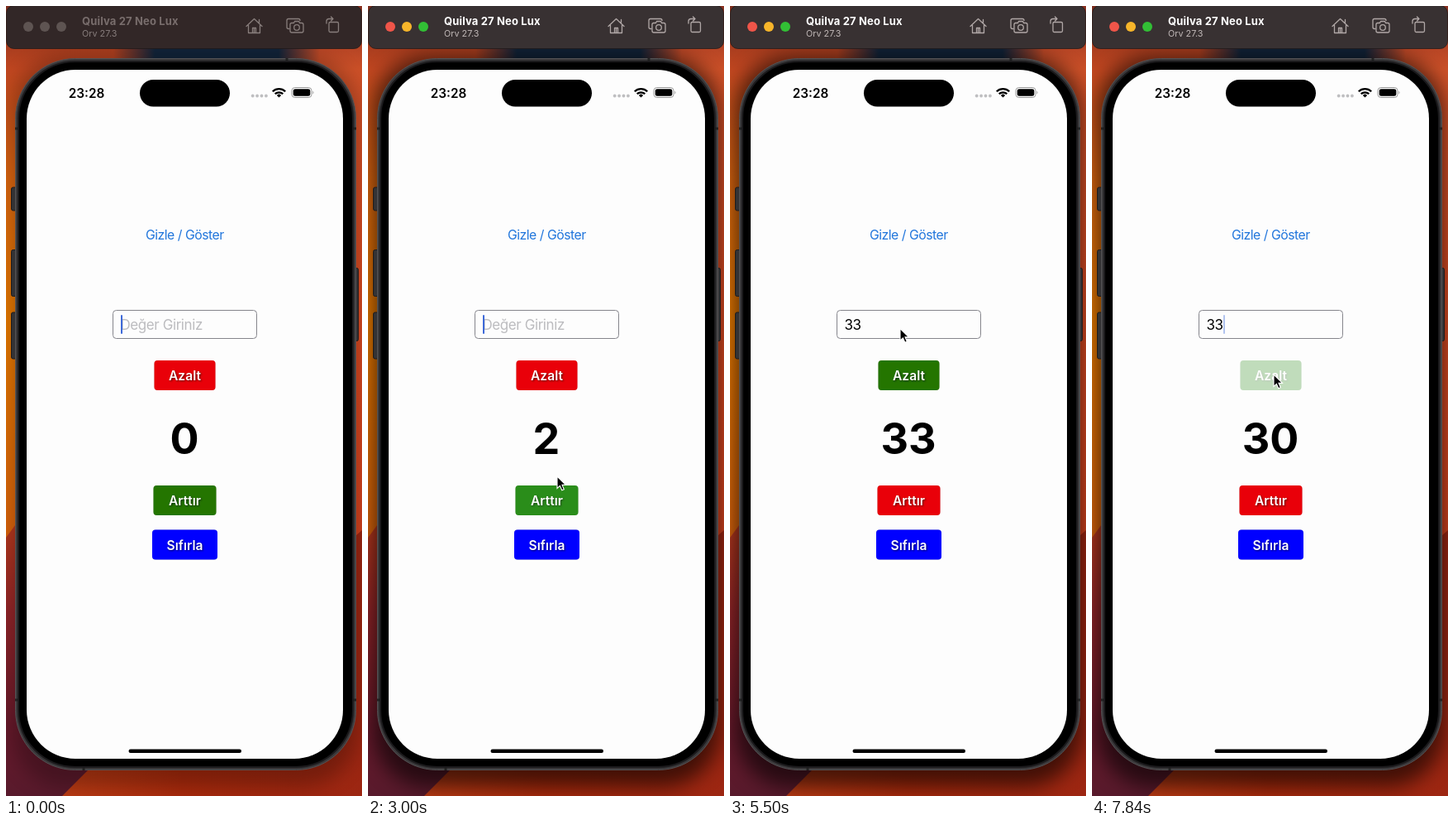
These frames come from a looping animation (431x954 px, 8 s). An HTML page:

```html
<!DOCTYPE html>
<html lang="tr">
<head>
<meta charset="utf-8">
<title>Sayaç</title>
<style>
html, body { margin: 0; width: 100%; height: 100%; overflow: hidden; background: #222; }
svg { display: block; width: 100%; height: 100%; }
text { font-family: Inter, "Open Sans", sans-serif; white-space: pre; }
.mid { text-anchor: middle; }
.btn text { font-size: 15.6px; font-weight: 600; fill: #fff; filter: drop-shadow(1px 1px 1px rgba(0,0,0,.6)); }
.btn rect { filter: drop-shadow(0 .5px .5px rgba(0,0,0,.25)); }
.field { font-size: 17px; letter-spacing: -.4px; }
.icon { fill: none; stroke-width: 1.3; stroke-linejoin: round; stroke-linecap: round; }
</style>
</head>
<body>
<svg viewBox="0 0 431 954" preserveAspectRatio="none">
  <defs>
    <linearGradient id="wallL" x2="0" y2="1">
      <stop offset="0" stop-color="#7c2c1c"/><stop offset=".08" stop-color="#c04620"/>
      <stop offset=".22" stop-color="#e06810"/><stop offset=".4" stop-color="#ec7c00"/>
      <stop offset=".67" stop-color="#e0660c"/>
    </linearGradient>
    <linearGradient id="wallR" x2="0" y2="1">
      <stop offset="0" stop-color="#8a3020"/><stop offset=".08" stop-color="#cc5028"/>
      <stop offset=".35" stop-color="#d64a22"/><stop offset=".67" stop-color="#d2421e"/>
    </linearGradient>
    <linearGradient id="maroon" x2="0" y2="1">
      <stop offset="0" stop-color="#c23e1c"/><stop offset=".35" stop-color="#96262a"/>
      <stop offset=".75" stop-color="#6a1a2c"/><stop offset="1" stop-color="#581a2c"/>
    </linearGradient>
    <linearGradient id="ember">
      <stop offset="0" stop-color="#bc3c14"/><stop offset=".4" stop-color="#aa2a0c"/>
      <stop offset="1" stop-color="#9c2612"/>
    </linearGradient>
    <linearGradient id="navy">
      <stop offset="0" stop-color="#12243a" stop-opacity="0"/><stop offset=".2" stop-color="#12243a"/>
      <stop offset=".8" stop-color="#12243a"/><stop offset="1" stop-color="#12243a" stop-opacity="0"/>
    </linearGradient>
    <filter id="blur" x="-20%" y="-20%" width="140%" height="140%"><feGaussianBlur stdDeviation="12"/></filter>
  </defs>

  <!-- wallpaper -->
  <rect width="431" height="954" fill="url(#wallL)"/>
  <rect x="215" width="216" height="954" fill="url(#wallR)"/>
  <rect x="130" y="48" width="250" height="30" fill="url(#navy)"/>
  <path d="M0 642L22 612V954H0Z M0 780H120V954H0Z" fill="url(#maroon)"/>
  <path d="M68 954L102 920L431 633V954Z" fill="url(#ember)"/>
  <rect id="shade" x="5" y="60" width="421" height="883" rx="70" filter="url(#blur)"/>

  <!-- simulator toolbar -->
  <rect id="bar" x=".5" y="-.5" width="430" height="52" rx="9" stroke="#1d1718" stroke-opacity=".7"/>
  <g id="lights"></g>
  <text id="model" x="92" y="23" font-size="13" font-weight="700" letter-spacing=".15">Quilva 27 Neo Lux</text>
  <text id="system" x="92" y="37" font-size="10.8">Orv 27.3</text>
  <g id="icons" class="icon" transform="translate(0 -1)">
    <path d="M291 25.500L300.500 16.500L310 25.500M293.500 24V33.500H307.500V24M306.500 21V17.500M298.500 33.500V27.500H302.500V33.500M300.500 28V33"/>
    <path d="M343 28.500H342Q340 28.500 340 26.500V18.500Q340 16.500 342 16.500H354Q356 16.500 356 18.500"/>
    <path d="M346 21.500H348.500L349.500 19.500H354.500L355.500 21.500H358Q360 21.500 360 23.500V31Q360 33 358 33H346Q344 33 344 31V23.500Q344 21.500 346 21.500Z"/>
    <circle cx="352" cy="27" r="3.300"/>
    <rect x="391" y="20.500" width="11.500" height="12" rx="1.500"/>
    <path d="M388 22V19.500Q388 16.500 391 16.500H396M393.500 14L396 16.500L393.500 19"/>
  </g>

  <!-- phone -->
  <g fill="#343335" stroke="#1c1b1d">
    <rect x="6.500" y="219" width="7" height="28" rx="2"/>
    <rect x="6.500" y="294.500" width="7" height="56" rx="2"/>
    <rect x="6.500" y="370" width="7" height="56" rx="2"/>
    <rect x="419" y="316.500" width="7.500" height="88" rx="2"/>
  </g>
  <rect x="11.500" y="63.500" width="412" height="859" rx="72" fill="#39383a" stroke="#555456"/>
  <path d="M11 148H16M419 148H424M11 838H16M419 838H424M94 918V923M340 63V68" stroke="#222" stroke-width="3"/>
  <rect x="15" y="67" width="405" height="852" rx="69" stroke="#1b1a1c" stroke-width="2"/>
  <rect x="25" y="77" width="383" height="832" rx="59" fill="#fdfdfd"/>

  <!-- status bar -->
  <rect x="162" y="89" width="109" height="32.500" rx="16.250"/>
  <text class="mid" x="97.500" y="110.500" font-size="15.300" font-weight="600">23:28</text>
  <g id="dots" fill="#bfbfc1"></g>
  <g fill="none" stroke="#000" stroke-width="2.300">
    <path d="M322.800 103.200A11 11 0 0 1 338.200 103.200M325.700 106.200A7 7 0 0 1 335.300 106.200"/>
    <path d="M330.500 110.500L327.900 107.900A3.700 3.700 0 0 1 333.100 107.900Z" fill="#000" stroke="none"/>
    <rect x="346" y="98.500" width="24" height="12" rx="3.800" stroke="#9a9a9a" stroke-width="1"/>
    <rect x="347.700" y="100.200" width="20.600" height="8.600" rx="2.400" fill="#000" stroke="none"/>
    <path d="M371.500 102.500Q373.500 104.500 371.500 106.500Z" fill="#9a9a9a" stroke="none"/>
  </g>

  <!-- app -->
  <text class="mid" x="216.300" y="282" font-size="15.800" letter-spacing="-.5" fill="#2176dc">Gizle / Göster</text>
  <rect x="129.500" y="367.500" width="174" height="34" rx="4" fill="none" stroke="#85858c"/>
  <text id="entry" class="field" x="138.400" y="391"></text>
  <rect id="caret" y="373" width="2" height="23" rx="1" fill="#3d69d8"/>
  <g class="btn">
    <rect x="179.500" y="428" width="74" height="36" rx="4"/>
    <text class="mid" x="216.500" y="452">Azalt</text>
  </g>
  <text id="count" class="mid" x="216" y="541" font-size="52" font-weight="700"></text>
  <g class="btn">
    <rect x="178.500" y="579" width="76" height="36" rx="4"/>
    <text class="mid" x="216.500" y="603">Arttır</text>
  </g>
  <g class="btn">
    <rect x="177" y="632.500" width="79" height="36" rx="4" fill="#00f"/>
    <text class="mid" x="216.500" y="656.500">Sıfırla</text>
  </g>
  <rect x="148.500" y="897.500" width="136.500" height="4.500" rx="2.250"/>

  <!-- pointer -->
  <g id="pointer">
    <g id="ring" fill="none">
      <circle cx=".8" cy="1.800" r="19.700" stroke="#fff" stroke-width="5"/>
      <circle cx=".8" cy="1.800" r="19.700" stroke="#000" stroke-width="3"/>
    </g>
    <path d="M0 0V14.500L3.400 11.400L5.800 16.800L8.300 15.700L6 10.400H10.500Z" stroke="#fff" stroke-width="1.100"/>
  </g>
</svg>
<script>
const LOOP = 8000, STEP = 1000 / 6;
const HOLD = 110, FADE = 230, DIM = 0.2;
const RED = '#e90009', GREEN = '#247500', GREEN_DIM = '#128000';
const FOCUS = 1600;

const $ = id => document.getElementById(id);
const [azalt, arttir] = document.querySelectorAll('.btn');

// time of press, button, resulting count
const clicks = [
  [1490], [2165, arttir, 1], [2690, arttir, 2],
  [3480, azalt, 1], [3980, azalt, 0], [4900],
  [6800, azalt, 32], [7250, azalt, 31], [7708, azalt, 30]
];
const typing = [[5290, '3'], [5480, '33']];
const path = [
  [700, 436, 470], [1333, 226, 441], [1650, 226, 441], [2100, 236, 587],
  [2830, 236, 587], [3000, 229, 568], [3350, 221, 447], [4350, 221, 447],
  [4667, 222, 416], [4850, 206, 389.5], [6200, 206, 389.5], [6600, 220, 445], [LOOP, 220, 445]
];

function addCircles(parent, n, x, dx, y, r) {
  for (let i = 0; i < n; i++) {
    const c = document.createElementNS('http://www.w3.org/2000/svg', 'circle');
    for (const [k, v] of Object.entries({ cx: x + i * dx, cy: y, r })) c.setAttribute(k, v);
    parent.append(c);
  }
}
addCircles($('lights'), 3, 27, 20, 25, 6);
addCircles($('dots'), 4, 298.7, 5.4, 108.5, 1.9);

const clamp = v => Math.max(0, Math.min(1, v));
const fill = (el, c) => el.setAttribute('fill', c);
const alpha = (el, a) => el.setAttribute('opacity', a);

function position(t) {
  const i = Math.max(1, path.findIndex(p => p[0] >= t));
  const [t0, x0, y0] = path[i - 1], [t1, x1, y1] = path[i];
  const u = clamp((t - t0) / (t1 - t0)), e = u * u * (3 - 2 * u);
  return [x0 + (x1 - x0) * e, y0 + (y1 - y0) * e];
}

function pressAlpha(button, t) {
  let a = 1;
  for (const [down, target] of clicks) {
    if (target !== button || t < down) continue;
    const up = down + HOLD;
    a = t < up ? 1 - (1 - DIM) * clamp((t - down) / 100)
               : DIM + (1 - DIM) * clamp((t - up) / FADE);
  }
  return a;
}

function paintButton(button, green, t) {
  const a = pressAlpha(button, t);
  alpha(button, a);
  fill(button.firstElementChild, !green ? RED : a < 0.95 ? GREEN_DIM : GREEN);
}

function caretAlpha(t) {
  const p = t % 1000 / 1000;
  return p < 0.5 ? clamp((0.495 - p) / 0.045) : clamp((p - 0.77) / 0.16);
}

function countAt(t) {
  const events = clicks.filter(c => c[1]).map(c => [c[0] + HOLD, c[2]])
    .concat(typing.map(([at, s]) => [at, +s]))
    .sort((a, b) => a[0] - b[0]);
  return events.reduce((n, [at, v]) => t >= at ? v : n, 0);
}

function draw(t) {
  const on = t >= FOCUS;
  [...$('lights').children].forEach((c, i) =>
    fill(c, on ? ['#ef5549', '#f7b52a', '#32bf35'][i] : '#5e5452'));
  fill($('bar'), on ? '#383132' : '#322727');
  fill($('model'), on ? '#fff' : '#786d6c');
  fill($('system'), on ? '#c0b8b7' : '#877d7c');
  $('icons').setAttribute('stroke', on ? '#b0a7a6' : '#887e7c');
  alpha($('shade'), on ? 0.6 : 0.27);

  const n = countAt(t), swapped = n >= 10;
  $('count').textContent = n;
  paintButton(azalt, swapped, t);
  paintButton(arttir, !swapped, t);

  const typed = typing.reduce((s, [at, v]) => t >= at ? v : s, '');
  $('entry').textContent = typed || 'Değer Giriniz';
  fill($('entry'), typed ? '#000' : '#bcbcbf');
  $('caret').setAttribute('x', 139 + 10 * typed.length);
  alpha($('caret'), caretAlpha(t));

  $('pointer').setAttribute('transform', `translate(${position(t)})`);
  alpha($('pointer'), t > path[0][0] ? 1 : 0);
  alpha($('ring'), clicks.some(([d]) => t >= d && t < d + HOLD) ? 1 : 0);
}

const start = performance.now();
function tick() {
  const t = (performance.now() - start) % LOOP;
  draw(Math.floor(t / STEP) * STEP);
  requestAnimationFrame(tick);
}
tick();
</script>
</body>
</html>
```
